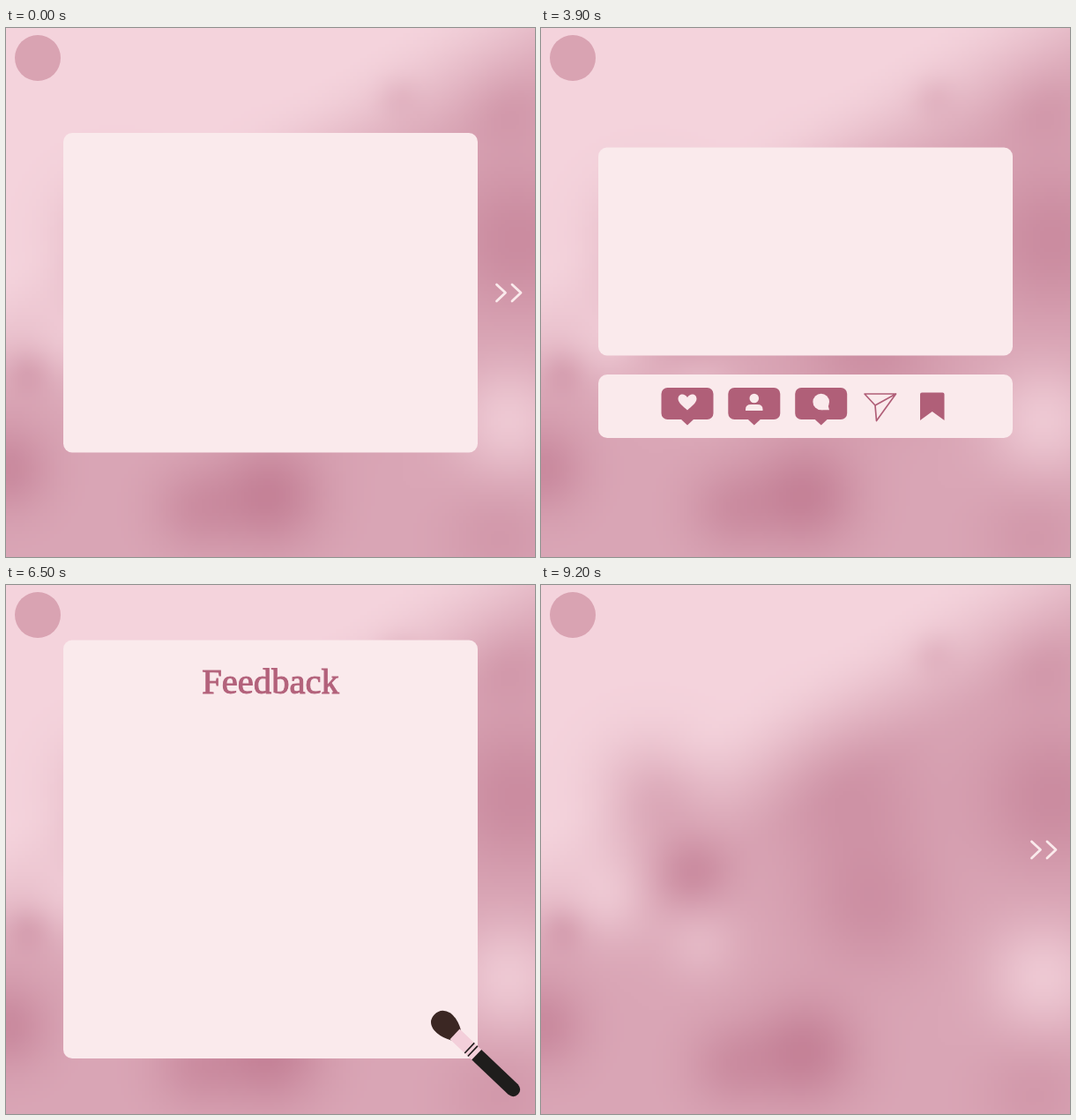
These frames come from a looping animation (600x600 px, 9300 ms). An HTML page with a canvas:

```html
<!DOCTYPE html>
<html lang="en">
<head>
<meta charset="utf-8">
<title>Feedback</title>
<style>
  html, body { margin: 0; height: 100%; overflow: hidden; background: #f4d3dc; }
  canvas, svg { position: absolute; width: 100%; height: 100%; }
  .card { fill: #faeaec; }
  .rose { fill: #b05f78; }
  .title { font: 40.6px "Liberation Serif", "Times New Roman", serif; fill: #b3627b; stroke: #b3627b; }
  .line { fill: none; stroke-linecap: round; stroke-linejoin: round; }
</style>
</head>
<body>
<canvas id="sky" width="150" height="150"></canvas>
<svg viewBox="0 0 600 600">
  <defs>
    <g id="bubble" class="rose">
      <rect width="59" height="36" rx="7"/>
      <path d="M21.500 35H37.500L29.500 42.500Z"/>
    </g>
  </defs>

  <circle cx="36" cy="34" r="26" fill="#d9a3b2"/>

  <path id="arrows" class="line" stroke="#faeaec" stroke-width="2.800" d="M556.500 291l10 9.300l-10 9.400m17.500 -18.700l10 9.300l-10 9.400"/>

  <rect id="card" class="card" x="65" width="470" rx="10"/>

  <g id="bar">
    <rect class="card" x="65" width="470" height="72" rx="10"/>
    <use href="#bubble" x="136.500" y="15"/>
    <use href="#bubble" x="212.300" y="15"/>
    <use href="#bubble" x="288.200" y="15"/>
    <g class="card">
      <path d="M166 40.500C161 36 155.500 32 155.500 27.500C155.500 21.500 163 20.500 166 26C169 20.500 176.500 21.500 176.500 27.500C176.500 32 171 36 166 40.500Z"/>
      <circle cx="241.800" cy="27" r="5.300"/>
      <path d="M232 41V39.500Q232 34 238 34H245.500Q251.500 34 251.500 39.500V41Z"/>
      <circle cx="317.700" cy="31" r="9.300"/>
      <path d="M318 40.300H327L325 33Z"/>
    </g>
    <path class="line" stroke="#b05f78" stroke-width="1.700" d="M367 22H402.500L380.500 52.500L379 35ZM379 35L402.500 22"/>
    <path class="rose" d="M432 20.500H455.500Q457.500 20.500 457.500 22.500V52L443.700 42L430 52V22.500Q430 20.500 432 20.500Z"/>
  </g>

  <text id="title" class="title" x="300" y="122.500" text-anchor="middle">Feedback</text>

  <g id="brush" transform="translate(496 497) rotate(43.500)">
    <path fill="#3b2723" d="M20 -8Q8 -15 -2 -14Q-14 -11 -14 0Q-14 11 -2 13Q8 14 20 8Z"/>
    <path fill="#f3cfda" d="M18 -8H56V8H18Z"/>
    <path stroke="#1f1b1b" stroke-width="1.600" d="M41 -8V8M46 -8V8"/>
    <path fill="#1f1d1c" d="M52 -8H109Q117 -7 117 0Q117 7 109 8H52Z"/>
  </g>
</svg>
<script>
const el = id => document.getElementById(id);

// Puffs that thicken (+) or thin (-) the cloud: x, y, radius, strength
const puffs = [
  [125, 235, 60, .35], [170, 325, 45, .28], [80, 360, 50, -.28], [180, 405, 45, -.2],
  [350, 240, 85, .2], [375, 365, 75, .22], [580, 240, 85, .28], [570, 445, 65, -.38],
  [300, 530, 60, .38], [215, 545, 50, .22], [0, 500, 50, .3], [570, 95, 45, .12],
  [25, 390, 25, .18], [445, 78, 24, .13], [560, 575, 60, .14]
];

// Cloud bank rising from left to right, 0 = clear and 1 = densest
function density(x, y) {
  const t = Math.min(1, Math.max(0, (y + .6 * x - 270) / 180));
  const bank = .5 * t * t * (3 - 2 * t);
  return puffs.reduce((sum, [px, py, r, s]) =>
    sum + s * Math.exp(-((x - px) ** 2 + (y - py) ** 2) / r ** 2), bank);
}

function paintSky({ width, height }, ctx) {
  const clear = [244, 211, 220], dense = [191, 120, 143];
  const image = ctx.createImageData(width, height);
  for (let i = 0; i < width * height; i++) {
    const x = (i % width + .5) * 600 / width, y = (Math.floor(i / width) + .5) * 600 / height;
    const d = Math.min(1, Math.max(0, density(x, y)));
    image.data.set([...clear.map((c, k) => c + (dense[k] - c) * d), 255], i * 4);
  }
  ctx.putImageData(image, 0, 0);
}
paintSky(el("sky"), el("sky").getContext("2d"));

const LOOP = 9300;
const scenes = [
  { from: 0, card: [119, 481.5], arrows: true },
  { from: 2500, card: [92.5, 414.5], bar: 436 },
  { from: 3900, card: [135.5, 371.5], bar: 393 },
  { from: 5100, card: [63, 538], title: true },
  { from: 6500, card: [62.5, 537], title: true, brush: true },
  { from: 7600, arrows: true }
];

const parts = ["arrows", "card", "bar", "title", "brush"];
let current;

function draw(time) {
  const scene = scenes.findLast(s => s.from <= time % LOOP);
  if (scene === current) return;
  current = scene;
  for (const id of parts) el(id).style.display = scene[id] ? "" : "none";
  if (scene.card) {
    const [top, bottom] = scene.card;
    el("card").setAttribute("y", top);
    el("card").setAttribute("height", bottom - top);
  }
  if (scene.bar) el("bar").setAttribute("transform", `translate(0 ${scene.bar})`);
}

const start = performance.now();
(function tick() {
  draw(performance.now() - start);
  requestAnimationFrame(tick);
})();
</script>
</body>
</html>
```
